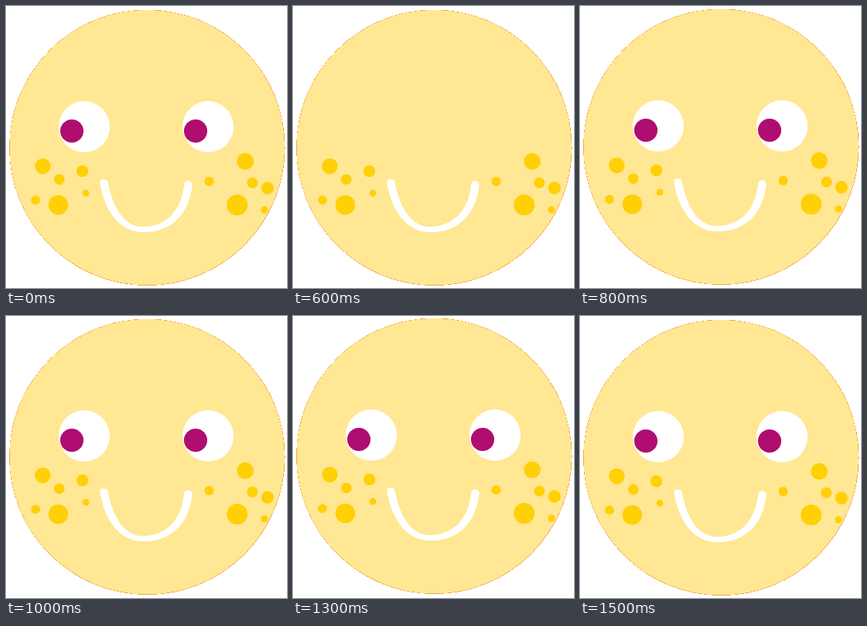
Animation, 352 px wide and 353 px high, one loop 1.6 s. Source, as an HTML page:

```html
<!DOCTYPE html>
<html lang="en">
<head>
<meta charset="utf-8">
<title>Blinking face</title>
<style>
  html, body { margin: 0; width: 100%; height: 100%; overflow: hidden; background: #fff; }
  svg { display: block; width: 352px; height: 353px; }
  .face { animation: bob 1.6s step-end infinite; }
  .lid { animation: blink 1.6s step-end infinite; }

  @keyframes bob {
    0%, 68.75%, 93.75%, 100% { transform: translateY(0); }
    50%, 62.5%, 75%, 87.5% { transform: translateY(-1px); }
    56.25%, 81.25% { transform: translateY(-2px); }
  }
  @keyframes blink {
    0%, 50%, 100% { transform: translateY(0); }
    25% { transform: translateY(16px); }
    31.25%, 43.75% { transform: translateY(39px); }
    37.5% { transform: translateY(67px); }
  }
</style>
</head>
<body>
<svg viewBox="0 0 352 353">
  <g class="face">
    <circle cx="176.8" cy="177.3" r="172.8" fill="#f3ac48" shape-rendering="crispEdges"/>
    <circle cx="176.7" cy="177.2" r="172.2" fill="#ffe794" shape-rendering="crispEdges"/>

    <g fill="#fff">
      <circle cx="98" cy="151.2" r="32.1"/>
      <circle cx="253.1" cy="151.2" r="32.1"/>
    </g>
    <g fill="#af0d70">
      <circle cx="82.5" cy="156.5" r="14.6"/>
      <circle cx="237.5" cy="156.5" r="14.6"/>
    </g>
    <rect class="lid" x="60" y="48" width="231" height="70" fill="#ffe794"/>

    <g fill="#ffd006">
      <circle cx="46.1" cy="200.6" r="9.9"/>
      <circle cx="66.8" cy="217.2" r="6.6"/>
      <circle cx="95.7" cy="206.7" r="7.4"/>
      <circle cx="37" cy="243" r="5.7"/>
      <circle cx="65.5" cy="249" r="12.3"/>
      <circle cx="100" cy="234.3" r="4.2"/>
      <circle cx="254.5" cy="219.7" r="5.9"/>
      <circle cx="299.7" cy="194.6" r="10.5"/>
      <circle cx="308.7" cy="221.3" r="6.8"/>
      <circle cx="327.5" cy="228" r="7.9"/>
      <circle cx="289.6" cy="249" r="13.1"/>
      <circle cx="323.7" cy="255" r="4.5"/>
    </g>

    <path fill="#fff" d="M117.6 220Q118 216.7 122 217Q127.5 217 127.7 221C134 254 149 276.6 172 276.6C203 275 219.5 255 223.3 223Q224 219 228 219Q233.3 219.5 233.3 224C229.5 261 207 283.2 172 283.2C141 283.2 122.5 254 117.6 220Z"/>
  </g>
</svg>
</body>
</html>
```
